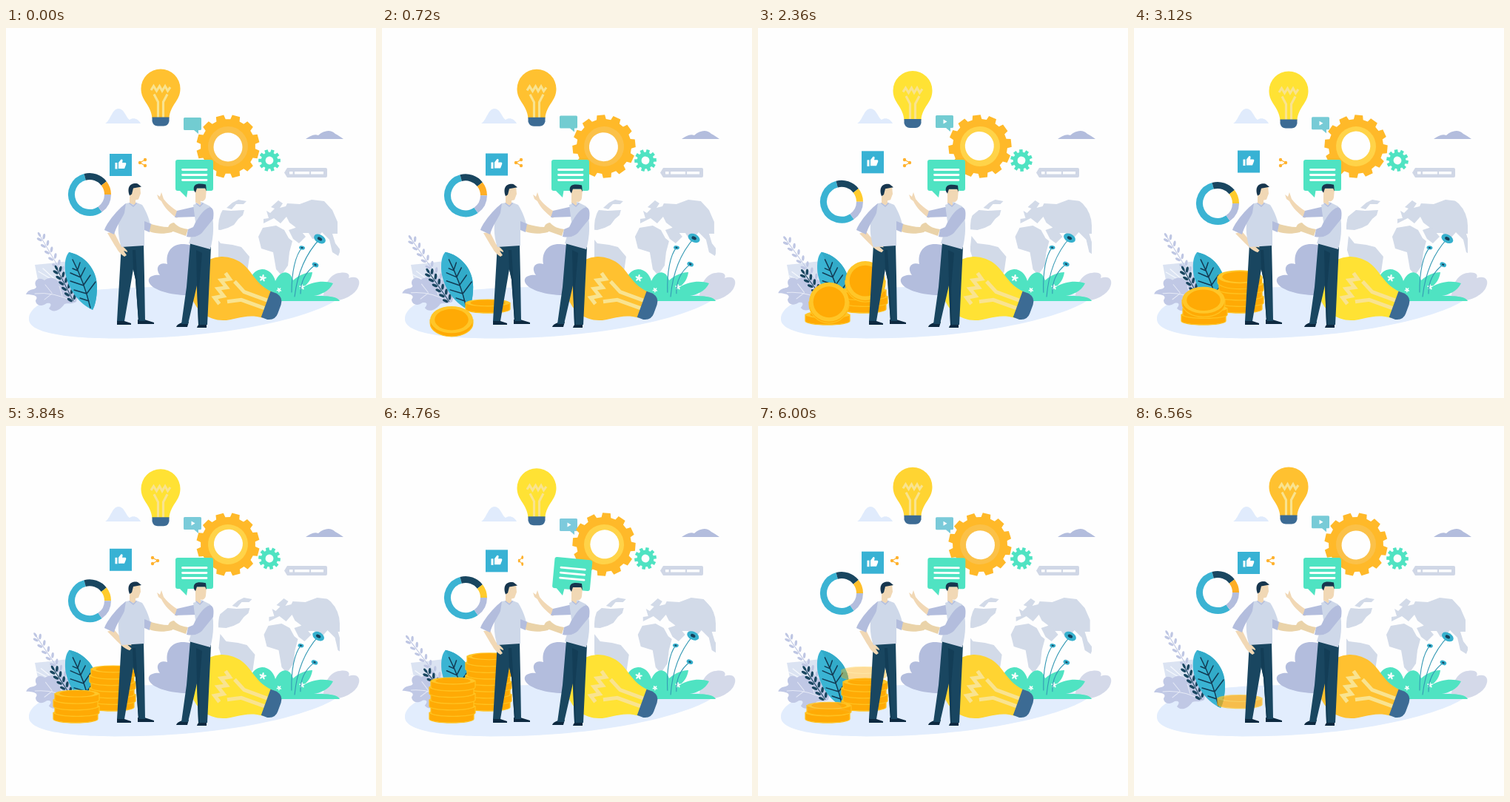
An HTML page for the animation above (6.6 s loop, 500 by 500 pixels).

```html
<!DOCTYPE html>
<html lang="en">
<head>
<meta charset="utf-8">
<title>Partnership</title>
<style>
html, body { margin: 0; width: 100%; height: 100%; overflow: hidden; background: #fefefe; }
svg { display: block; width: 100vw; height: 100vh; }
.line { fill: none; stroke-linecap: round; stroke-linejoin: round; }
</style>
</head>
<body>
<svg id="stage" viewBox="0 0 500 500" xmlns="http://www.w3.org/2000/svg"></svg>
<script>
const LOOP = 6600, STEP = 40, TAU = Math.PI * 2;
const stage = document.getElementById('stage');

const path = (d, fill, extra = '') => `<path d="${d}" fill="${fill}" ${extra}/>`;
const line = (d, color, width, extra = '') =>
  `<path class="line" d="${d}" stroke="${color}" stroke-width="${width}" ${extra}/>`;
const oval = (x, y, rx, ry, fill, turn = 0) =>
  `<ellipse cx="${x}" cy="${y}" rx="${rx}" ry="${ry}" fill="${fill}" transform="rotate(${turn} ${x} ${y})"/>`;
const box = (x, y, w, h, fill, r = 0) =>
  `<rect x="${x}" y="${y}" width="${w}" height="${h}" rx="${r}" fill="${fill}"/>`;
const group = (id, body) => `<g id="${id}">${body}</g>`;

function polar(r, deg) {
  const a = deg * Math.PI / 180;
  return (r * Math.cos(a)).toFixed(2) + ' ' + (r * Math.sin(a)).toFixed(2);
}

function gear(teeth, outer, inner) {
  const pts = [], pitch = 360 / teeth;
  for (let i = 0; i < teeth; i++) {
    const a = (i + 0.5) * pitch - 90;
    pts.push(polar(inner, a - pitch * 0.33), polar(outer, a - pitch * 0.24),
      polar(outer, a + pitch * 0.24), polar(inner, a + pitch * 0.33));
  }
  return 'M' + pts.join('L') + 'Z';
}

function arc(from, to, color, cls = '') {
  const big = to - from > 180 ? 1 : 0;
  return `<path class="${cls}" d="M${polar(24.5, from)}A24.5 24.5 0 ${big} 1 ${polar(24.5, to)}" fill="none" stroke="${color}" stroke-width="9"/>`;
}

function bulb() {
  return path('M-26.5 0A26.5 26.5 0 0 1 26.5 0C26.5 17 13 21 11.5 40H-11.5C-13 21 -26.5 17 -26.5 0Z', '#ffc130', 'class="glow"') +
    `<path d="M-13 2L-9.500 -3.500L-5.500 3L-1.500 -3.500L2 3L6 -3.500L9.500 3L13 -2M-9 7.500L-3.500 18V39M9 7.500L3.500 18V39" fill="none" stroke="#f9e38f" stroke-width="3.1"/>` +
    path('M-11.5 38.500H11.5V44Q10 50.5 4 50.5H-4Q-10 50.5 -11.5 44Z', '#3c6b94');
}

// Paired leaves along a straight stem, one more at its tip
function twig(x, y, x2, y2, pairs, size, color) {
  const deg = Math.atan2(y2 - y, x2 - x) * 180 / Math.PI;
  let out = line(`M${x} ${y}L${x2} ${y2}`, color, 1) + oval(x, y, size * 0.9, size * 0.4, color, deg);
  for (let i = 0; i < pairs; i++) {
    const k = (i + 0.7) / pairs, px = x + (x2 - x) * k, py = y + (y2 - y) * k;
    const n = size * 0.9;
    out += oval(px - n, py + n * 0.2, size, size * 0.45, color, deg - 30);
    out += oval(px + n * 0.8, py - n, size, size * 0.45, color, deg + 40);
  }
  return out;
}

const star = (x, y, s, turn) => `<g transform="translate(${x} ${y}) rotate(${turn})">` +
  [0, 72, 144, 216, 288].map(a => `<ellipse cx="0" cy="${-s * 0.5}" rx="${s * 0.24}" ry="${s * 0.5}" fill="#fff" transform="rotate(${a})"/>`).join('') + '</g>';

const flower = (x, y, s, turn) => `<g transform="translate(${x} ${y}) rotate(${turn})">` +
  oval(0, 0, s, s * 0.65, '#36b0cd') + oval(0, 0, s * 0.4, s * 0.25, '#16405a') + '</g>';

const land = '#d2dae8', mist = '#b3bddd', shirt = '#ced8e9', skin = '#f1d8b5', arm = '#ead3a9';
const navy = '#194660', night = '#0d2940', mint = '#4fe3c2';

const globe = '<clipPath id="disc"><rect x="287" y="225" width="164" height="165" rx="42"/></clipPath><g clip-path="url(#disc)">' + group('world',
  path('M277 272L281 255L292 246L304 247L322 246L320 253L314 258L308 266L300 270L290 273ZM298 243L306 236L314 232L325 234L321 238L311 238L305 245ZM282 281L290 291L306 293L318 296L329 309L326 330L310 350L294 345L280 300Z', land) +
  path('M341 282L347 270L365 267L376 273L382 284L387 288L383 303L381 321L372 334L365 326L361 303L345 298Z', land) +
  path('M348 264V258L355 257L352 247L357 250L363 244L358 242L368 233L374 237L370 243L378 241L380 237L397 238L413 232L430 234L441 246L448 262V278L441 278L445 291L452 300L449 308L441 303L437 286L427 276L420 284L414 285L409 277L396 277L391 269L383 263L379 255L371 264L362 257Z', land) +
  path('M382 273L394 269L405 282L396 291L388 285Z', land)) + '</g>';

const scenery =
  path('M31 393C32 366 95 351 200 350L452 361C448 377 335 420 145 419.500C76 419 30 411 31 393Z', '#e2edfd') +
  path('M134 129C141 126 143 109 152 109C160 109 162 121 167 124C172 120 179 123 182 129Z', '#e0ebfc') +
  path('M405 150C411 146 416 143 422 145C430 138 439 137 445 143C449 145 452 147 456 150Z', mist) +
  globe +
  path('M429 369C428 349 437 332 451 331C463 329 465 334 463 338C475 334 481 341 475 352C470 361 455 369 441 369Z', '#d4d9e9') +
  path('M285 361H240C219 360 196 353 193 343C191 335 202 333 208 334C200 322 209 316 218 319C215 301 226 291 241 292C256 293 270 303 285 324Z', mist) +
  path('M330 369C325 347 330 327 346 326C356 326 362 334 364 342C370 328 383 325 388 341C396 334 405 330 414 330C413 339 408 346 402 350C416 342 430 341 442 345C437 356 424 361 416 362C432 362 448 362 451 369Z', mint) +
  star(347, 338, 5, 10) + star(369, 354, 3.5, 40) + star(400, 350, 4, 0) +
  group('flowers',
    line('M386 357C386 330 391 307 400 297M390 363C394 330 407 303 424 285M398 359C398 341 407 328 418 320', '#3499b4', 1.1) +
    flower(424, 285, 8.5, 30) + flower(400, 297, 4, 10) + flower(418, 320, 4.5, 25));

const plants =
  path('M39 320Q62 318 84 315L86 351H45Z', '#dbe3f2') +
  group('pale', line('M44 329L64 341M50 325L72 345', '#f5f8fd', 1.2) +
    twig(45, 279, 86, 349, 8, 3.8, '#bec6e3')) +
  group('oak',
    path('M27 360C31 351 39 355 41 350C36 342 44 335 52 341C58 336 66 337 70 342C77 337 85 341 85 348C94 350 98 360 95 370C87 374 83 371 79 373C72 383 63 385 58 379C63 373 60 371 55 372C47 378 40 374 40 368C45 362 37 360 27 360Z', '#c0c8e5') +
    line('M39 359Q65 356 91 370M53 347L62 358M72 349L76 362M52 367L62 359', '#e6eaf6', 1)) +
  group('dark', twig(68, 324, 91, 369, 6, 4, navy)) +
  group('leaf',
    path('M85 303C106 307 123 326 123 350C123 365 120 376 117 381C100 373 84 355 80 330C79 318 80 309 85 303Z', '#3ab4d3') +
    path('M85 303C106 307 123 326 123 350C123 365 120 376 117 381Q106 339 85 303Z', '#32abc9') +
    line('M90 313Q106 344 114 378M97 328L90 325M101 337L87 331M105 348L87 342M109 359L92 354M112 369L100 365M97 326L100 317M101 336L107 324M105 347L114 334M109 359L121 343', '#123b54', 1.5));

const leftMan =
  path('M150 395L157 395L169 399V401H150ZM178 394L187 394L200 398V400H178Z', night) +
  path('M156 292H186L187 336L188 396H179L175 340L172 326L160 396H150Z', navy) +
  path('M171 300L172 326L175 340L179 396H181L175 300Z', '#133d56') +
  group('forearm', path('M137 277L146 276L154 292C161 298 165 301 164 303L159 301L163 307L160 309C152 304 150 298 147 294Z', skin)) +
  path('M162 237L174 235L184 239C190 248 195 261 196 272L187 268V294L156 296C151 281 148 257 162 237Z', shirt) +
  path('M162 237C151 245 137 262 133 273L146 279C149 268 156 259 160 250Z', mist) +
  path('M187 261L197 265L194 276L187 273Z', mist) +
  path('M196 265C204 267 212 269 219 269L228 265L230 271L224 276C212 279 202 278 194 275Z', arm) +
  group('leftHead',
    path('M167 228L169 216L181 212L182 223L179 231L175 232V239L167 236Z', skin) +
    path('M167 226C162 212 171 208 178 210L183 214L172 216L170 224Z', '#17364e')) +
  line('M167 237L172 241L176 237', mist, 1.5);

const rightMan =
  path('M230 404C231 400 237 399 239 397H247L245 404ZM258 405C259 401 262 400 264 398H271V405Z', night) +
  path('M249 290L277 296L272 401H260L258 348L246 400H237L244 350Z', navy) +
  path('M257 300L258 348L260 401H262L261 350L265 304Z', '#133d56') +
  path('M231 257C223 251 214 243 210 234L206 231L204 225L208 228L210 222L213 231C218 238 227 245 236 250Z', skin) +
  path('M257 241L231 247L228 256L257 255Z', mist) +
  path('M253 239L264 235L276 241C282 261 281 282 276 299L247 291L256 262Z', shirt) +
  path('M246 272C239 271 232 269 227 263C220 264 218 269 220 273L226 275L243 281Z', arm) +
  path('M276 242C267 244 259 257 253 269L246 272L244 282C256 284 263 280 267 274L280 258C281 250 281 244 276 242Z', mist) +
  group('rightHead',
    path('M256 216H271L270 228C269 234 264 234 263 233V239L256 235Z', skin) +
    path('M254 219C252 209 261 209 270 211L271 220L269 216H258L256 222Z', '#17364e')) +
  line('M257 237L262 241L266 237', mist, 1.5);

const icons =
  group('top', bulb()) +
  group('donut', arc(55, 255, '#3bb3d3') + arc(-105, -38, navy) + arc(-38, 0, '#ffae25', 'seg') + arc(0, 55, mist)) +
  group('like', box(140, 170, 30, 30, '#38b2d4') + box(147.5, 182, 3, 8.5, '#fff') +
    path('M152 182L155.5 177.5C158 177 158 179 157 182H161.5Q163 183 162 185L160 190H152Z', '#fff')) +
  group('share', line('M188 178L181 182L188 186', '#ffb22e', 1.2) +
    oval(181, 182, 2.2, 2.2, '#ffb22e') + oval(188, 178, 2.2, 2.2, '#ffb22e') + oval(188, 186, 2.2, 2.2, '#ffb22e')) +
  group('clip', path('M241.5 121H262.5Q264 121 264 122.5V136.500Q264 138 262.5 138H260V143L254 138H241.5Q240 138 240 136.5V122.5Q240 121 241.5 121Z', '#72ccd1', 'id="clipShape"') +
    path('M250.5 126.5L255.5 129.5L250.5 132.5Z', '#fff', 'id="play"')) +
  group('gear', path(gear(12, 42.8, 37), '#ffb929') + `<circle id="ring" r="27" fill="#fbc148"/>` + oval(0, 0.9, 19.5, 19.5, '#fefefe')) +
  group('cog', path(gear(10, 15, 11.3), mint) + oval(0, 0, 5.4, 5.4, '#fefefe')) +
  path('M376 195.5L380 189H432Q434 189 434 191V200Q434 202 432 202H380Z', '#d0d7e6') +
  box(383, 194, 4.5, 3.5, '#fff') + box(390, 194, 20, 3.5, '#fff') + box(412, 194, 17, 3.5, '#fff') +
  group('talk', path('M232 178H277Q280 178 280 181V217Q280 220 277 220H245.500L244 229L235 220H232Q229 220 229 217V181Q229 178 232 178Z', mint) +
    line('M238.500 191.500H271M238.500 198.500H271M238.500 205.500H271', '#fff', 2.8));

stage.innerHTML = scenery + '<g transform="translate(292.500 352) rotate(-70) scale(1.62)">' + bulb() + '</g>' +
  icons + plants + group('coins', '') + leftMan + rightMan;

const $ = id => document.getElementById(id);
const move = (id, value) => $(id).setAttribute('transform', value);

// Coins: start and length of each spin, half turns, hop
const spins = {
  back: [[60, 500], [800, 500], [1500, 500], [2100, 520], [2650, 500], [3220, 500], [3850, 450], [4240, 480]],
  front: [[40, 860, 1, -11], [1230, 1510, 2, 12], [2740, 480], [3250, 500], [3900, 500], [4250, 490]]
};
const coins = [];
function pile(list, x, base, outFrom, outStep, outLength) {
  list.forEach(([start, length, turns = 1, hop = 4], i) => {
    const g = document.createElementNS('http://www.w3.org/2000/svg', 'g');
    const cx = x + (i % 2 ? 1 : -1);
    g.innerHTML = path('', '#ffaa05', 'stroke="#ffc21f" stroke-width="1.3"') +
      oval(cx, 0, 30, 4, '#ffc628') + oval(cx, 0, 23, 3, '#ffaa05');
    $('coins').append(g);
    coins.push({ g, x: cx, y: base - 8.6 * (i + 1), start, length, turns, hop,
      out: outFrom + (list.length - 1 - i) * outStep, outLength });
  });
}
pile(spins.back, 144, 380, 5515, 146, 80);
pile(spins.front, 95, 396, 5385, 150, 160);

function drawCoin(c, t) {
  const u = Math.min(1, (t - c.start) / c.length);
  const gone = Math.min(1, Math.max(0, (t - c.out) / c.outLength));
  const shown = u > 0 && gone < 1;
  c.g.style.display = shown ? '' : 'none';
  if (!shown) return;
  const turn = Math.abs(Math.sin(Math.PI * c.turns * u));
  const y = c.y - c.hop * Math.sin(Math.PI * u) - 12 * gone;
  const rx = 30 - 3 * turn * turn, ry = 5 + 21.5 * turn, thick = 8.6 - 6.6 * turn;
  const [side, rim, face] = c.g.children;
  side.setAttribute('d', `M${c.x - rx} ${y}V${y + thick}A${rx} ${ry} 0 0 0 ${c.x + rx} ${y + thick}V${y}Z`);
  [[rim, 1], [face, 0.79]].forEach(([e, k]) => {
    e.setAttribute('cy', y);
    e.setAttribute('rx', rx * k);
    e.setAttribute('ry', ry * k);
    e.removeAttribute('transform');
  });
  c.g.setAttribute('opacity', Math.min(1, u * 8) * (1 - gone));
}

// Eased value from a flat table: time, value, time, value...
function track(t, table) {
  for (let i = 2; i < table.length; i += 2) {
    if (t <= table[i]) {
      const k = (t - table[i - 2]) / (table[i] - table[i - 2]);
      return table[i - 1] + (table[i + 1] - table[i - 1]) * k * k * (3 - 2 * k);
    }
  }
  return table[table.length - 1];
}

const mix = (a, b, k) => 'rgb(' + a.map((v, i) => Math.round(v + (b[i] - v) * k)).join() + ')';

const tilt = [0, 0, 1000, 0, 1440, 6, 1900, 6, 2340, 0, 4200, 0, 4920, 6, 5500, 6, 6100, 0, LOOP, 0];
const flip = [0, 1, 1280, 1, 1900, -1, 4150, -1, 4980, 1, LOOP, 1];
const reach = [0, 0, 900, 0, 1350, -14, 4050, -14, 4550, 0, LOOP, 0];
const light = [0, 0, 1460, 0, 2300, 1, 5600, 1, 6500, 0, LOOP, 0];
const shine = [0, 0, 1460, 0, 2300, 1, 4760, 1, 5440, 0, LOOP, 0];
const playing = [0, 0, 1460, 0, 2200, 1, 6560, 1, LOOP, 0];

function draw(t) {
  const a = TAU * t / LOOP, dip = (1 - Math.cos(a)) / 2, sway = Math.abs(Math.sin(a));
  const lit = track(t, light), play = track(t, playing), side = track(t, flip);

  move('top', `translate(209 ${82 + 3 * dip})`);
  move('donut', `translate(113 ${225 + 12 * dip})`);
  move('like', `translate(0 ${-4.5 * dip})`);
  move('share', `translate(193 182) scale(${side} ${1 + 0.4 * (1 - Math.abs(side))}) translate(-193 -182)`);
  move('clip', `translate(0 ${-4 * Math.sin(a)})`);
  move('gear', `translate(300 160) rotate(${360 * t / LOOP})`);
  move('cog', `translate(356 179) rotate(${-360 * t / LOOP})`);
  move('talk', `rotate(${track(t, tilt)} 244 229)`);
  move('world', `translate(${8 * dip} 0)`);
  move('flowers', `rotate(${-2.8 * sway} 390 362)`);
  move('pale', `rotate(${-7 * sway} 95 370)`);
  move('dark', `rotate(${-12 * sway} 95 372)`);
  move('oak', `rotate(${2 * sway} 95 370)`);
  move('leaf', `rotate(${0.5 * sway} 117 381)`);
  move('forearm', `rotate(${track(t, reach)} 140 277)`);
  move('leftHead', `translate(0 ${0.5 + sway})`);
  move('rightHead', `translate(0 ${0.5 + 1.5 * sway})`);

  const yellow = mix([255, 193, 48], [255, 226, 52], lit);
  document.querySelectorAll('.glow').forEach(e => e.setAttribute('fill', yellow));
  document.querySelector('.seg').setAttribute('stroke', mix([255, 174, 37], [255, 203, 45], lit));
  $('ring').setAttribute('fill', mix([251, 193, 72], [255, 211, 72], track(t, shine)));
  $('clipShape').setAttribute('fill', mix([114, 204, 209], [125, 202, 220], play * (0.5 - Math.sin(a) / 2)));
  $('play').setAttribute('opacity', play);
  coins.forEach(c => drawCoin(c, t));
}

const begin = performance.now();
function tick() {
  const t = (performance.now() - begin) % LOOP;
  draw(Math.floor(t / STEP) * STEP);
  requestAnimationFrame(tick);
}
tick();
</script>
</body>
</html>
```
